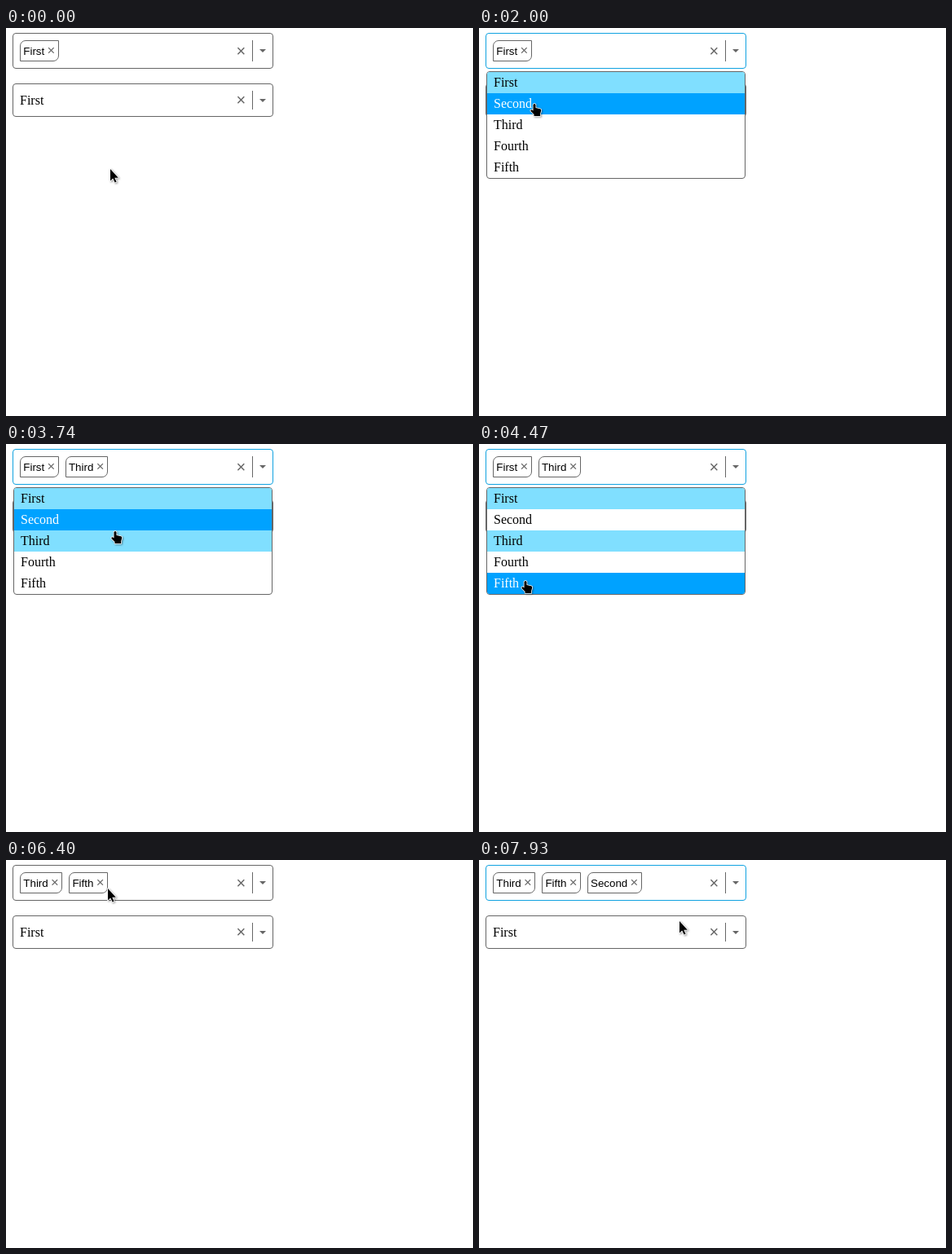
An HTML page for the animation above (8000 ms loop, 573x476 px).

```html
<!DOCTYPE html>
<html lang="en">
<head>
<meta charset="utf-8">
<style>
  html, body { margin: 0; width: 100%; height: 100%; overflow: hidden; background: #fff; }
  body { font: 16px "Liberation Serif", serif; cursor: default; }
  .select {
    position: absolute; left: 8px; width: 320px; box-sizing: border-box; padding: 8px;
    display: flex; align-items: center; gap: 8px; border: 1px solid #666; border-radius: 4px;
  }
  #multi { top: 6px; height: 44px; z-index: 1; }
  #single { top: 68px; height: 41px; }
  .focus { border-color: #10a2e0; }
  .value { flex-grow: 1; display: flex; gap: 8px; }
  .badge, .clear { font: 13.333px "Liberation Sans", sans-serif; }
  .badge {
    display: flex; align-items: center; gap: .25em; height: 26px; box-sizing: border-box;
    padding: 0 .25em; border: 1px solid #666; border-radius: 7px 0;
  }
  .badge i { font: 1.25em "Liberation Sans", sans-serif; color: #666; }
  .badge.hover { background: #fcc; border-color: red; }
  .badge.hover i { color: red; }
  .clear { font-size: 20px; color: #666; }
  .divider { align-self: stretch; width: .8px; background: #666; }
  .caret { translate: 0 25%; border: 4px solid transparent; border-top-color: #666; }
  .options {
    position: absolute; left: 0; top: calc(100% + 4px); width: 100%; box-sizing: border-box;
    border: 1px solid #666; border-radius: 4px; overflow: hidden; background: #fff;
  }
  .option { height: 18px; line-height: 18px; padding: 4px 8px; }
  .chosen { background: #80dfff; }
  .active { background: #00a2ff; color: #fff; }
  #pointer { position: absolute; left: 0; top: 0; z-index: 2; overflow: visible; pointer-events: none; }
  #pointer path { stroke: #fff; stroke-width: 1.6; stroke-linejoin: round; paint-order: stroke; filter: drop-shadow(1px 1px 1px #0006); }
</style>
</head>
<body>
<div class="select" id="multi"></div>
<div class="select" id="single"></div>
<svg id="pointer" width="16" height="20">
  <path id="arrow" d="M0 0V14.6L3.2 11.6L5.6 16.6L7.6 15.7L5.3 10.8H9.8Z"/>
  <path id="hand" d="M-1.5 3Q0 1 1.5 3V7L7 8.2Q8.5 8.6 8.2 10.5L7.2 14V17H-.5V15L-4.6 11Q-5 9 -3.2 9.2L-1.5 10.6Z"/>
</svg>
<script>
const [multi, single, pointer, arrow, hand] =
  ['multi', 'single', 'pointer', 'arrow', 'hand'].map(id => document.getElementById(id));
const LOOP = 8000, CLICK_DELAY = 160, REST = 240;
const OPTIONS = ['First', 'Second', 'Third', 'Fourth', 'Fifth'];

const open = s => { s.open = s.focus = true; };
const pick = label => s => { s.open = false; s.chosen.push(label); };
const remove = label => s => { s.focus = false; s.chosen = s.chosen.filter(c => c !== label); };

// Pointer stops: arrival time, x, y and what a click there does
const stops = [
  [80, 128, 173], [500, 240, 75], [1200, 80, 30, open],
  [2000, 68, 91], [2160, 57, 135], [2480, 52, 122, pick('Third')],
  [3260, 152, 32, open], [3740, 134, 105], [4390, 57, 166, pick('Fifth')],
  [5240, 98, 33], [5670, 56, 28, remove('First')], [6400, 125, 35],
  [6560, 150, 38, open], [7360, 105, 93, pick('Second')], [7930, 246, 75]
];

function pointerAt(t) {
  const next = stops.findIndex(s => s[0] > t);
  if (next < 1) return (next ? stops.at(-1) : stops[0]).slice(1, 3);
  const [from, to] = [stops[next - 1], stops[next]];
  const start = from[0] + (from[3] ? REST : 0);
  const k = Math.max(0, (t - start) / (to[0] - start));
  const eased = k * k * (3 - 2 * k);
  return [1, 2].map(i => Math.round(from[i] + (to[i] - from[i]) * eased));
}

function stateAt(t) {
  const state = { chosen: ['First'], open: false, focus: false };
  for (const [time, , , click] of stops)
    if (click && t >= time + CLICK_DELAY) click(state);
  return state;
}

const select = (value, list = '') => `<div class="value">${value}</div>
  <span class="clear">×</span><span class="divider"></span><span class="caret"></span>${list}`;

function render({ chosen, open }) {
  const badges = chosen.map(c => `<span class="badge">${c}<i>×</i></span>`).join('');
  const options = OPTIONS.map(o =>
    `<div class="option ${chosen.includes(o) ? 'chosen' : ''}">${o}</div>`).join('');
  multi.innerHTML = select(badges, open ? `<div class="options">${options}</div>` : '');
}

let shown;
function draw(t) {
  const state = stateAt(t), [x, y] = pointerAt(t);
  const key = JSON.stringify(state);
  if (key !== shown) render(state);
  shown = key;
  multi.classList.toggle('focus', state.focus);

  const target = document.elementFromPoint(x, y)?.closest('.badge, .option');
  const active = target?.matches('.option') ? target : multi.querySelector('.option');
  for (const el of multi.querySelectorAll('.badge')) el.classList.toggle('hover', el === target);
  for (const el of multi.querySelectorAll('.option')) el.classList.toggle('active', el === active);

  pointer.style.transform = `translate(${x}px, ${y}px)`;
  hand.style.display = target ? '' : 'none';
  arrow.style.display = target ? 'none' : '';
}

function tick() {
  draw(performance.now() % LOOP);
  requestAnimationFrame(tick);
}
single.innerHTML = select('First');
tick();
</script>
</body>
</html>
```
